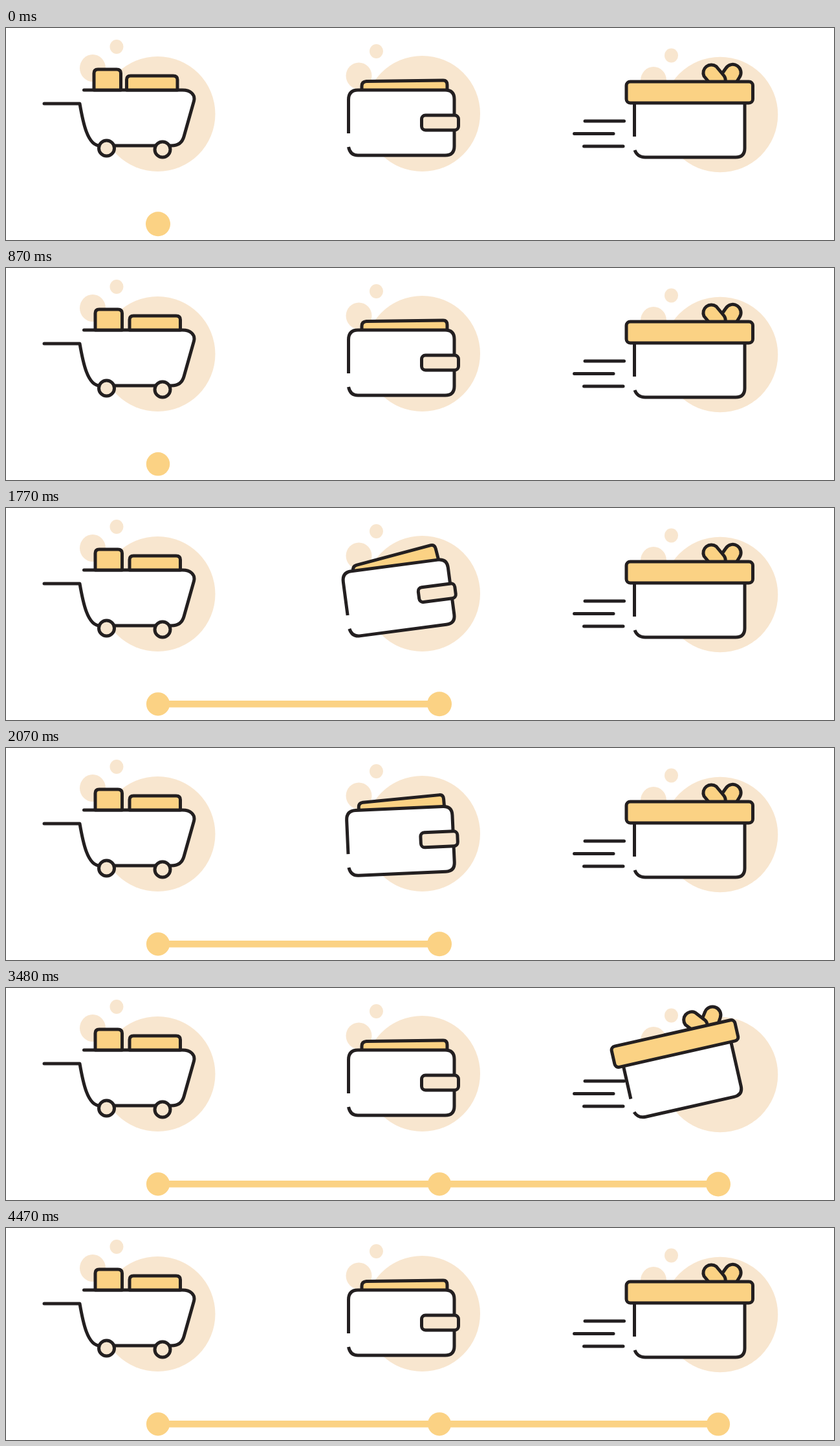
Animation of 1280 by 328 pixels, one loop 4.95 s. Source, as an HTML page:

```html
<!DOCTYPE html>
<html lang="en">
<head>
<meta charset="utf-8">
<title>Order steps</title>
<style>
  html, body { margin: 0; width: 100%; height: 100%; overflow: hidden; background: #fff; }
  svg { display: block; width: 100vw; height: 100vh; }
  .pale { fill: #f8e6cf; }
  .gold { fill: #fbd284; }
  .white { fill: #fff; }
  .ink { stroke: #231f20; stroke-width: 5; stroke-linejoin: round; }
  .round { stroke-linecap: round; }
</style>
</head>
<body>
<svg viewBox="0 0 1280 328">
  <g class="pale">
    <circle cx="234.5" cy="133" r="89"/>
    <ellipse cx="134" cy="62" rx="20" ry="21"/>
    <ellipse cx="171" cy="29" rx="10.5" ry="11"/>
    <circle cx="643.5" cy="132.5" r="89.5"/>
    <ellipse cx="545.5" cy="74" rx="20" ry="20.5"/>
    <ellipse cx="572.5" cy="36" rx="10.5" ry="11"/>
    <circle cx="1104" cy="134" r="89.3"/>
    <ellipse cx="1001" cy="81" rx="20" ry="21"/>
    <ellipse cx="1028.5" cy="42.5" rx="10.5" ry="11"/>
  </g>

  <g id="cart" class="ink round">
    <path class="white" d="M59 117H114C119 146 126 182 145 182H256Q271 182 275 168L290.500 113C293 103 285 96 273 96H120.500"/>
    <path id="tall" class="gold" d="M138 96V70Q138 64 144 64H173Q179.500 64 179.500 70V96Z"/>
    <path id="wide" class="gold" d="M191 96V80Q191 74 197 74H263Q269.500 74 269.500 80V96Z"/>
    <circle class="pale" cx="155.500" cy="186" r="12"/>
    <circle class="pale" cx="242" cy="188" r="12"/>
  </g>

  <g id="wallet" class="ink">
    <path id="card" class="gold" d="M550 108V90Q550 83 557 82.500L676 81Q682 81 682 88V108Z"/>
    <path class="white" d="M529.500 163V111Q529.500 96 544 96H679Q693 96 693 110V183Q693 197 679 197H544Q532 197 529.500 184"/>
    <rect class="pale" x="642.500" y="135" width="57" height="23" rx="6"/>
  </g>

  <path class="ink round" d="M895 144H955.500M878.500 163.500H939M893.500 183H954"/>
  <g id="gift" class="ink">
    <path class="white" d="M971.500 116V168L972 189Q976 200 988 200H1128Q1142 200 1142 186V116" stroke="none" style="stroke:none"/>
    <path fill="none" d="M971.500 116V168M972 189Q976 200 988 200H1128Q1142 200 1142 186V116"/>
    <path class="gold" d="M1106 72L1113 62A12.500 12.500 0 0 1 1134 76L1129 84H1106Z"/>
    <path class="gold" d="M1087 84L1079 74.500A12.500 12.500 0 0 1 1098 59.500L1110 74Q1113 78 1112 84Z"/>
    <rect class="gold" x="959" y="83" width="195.500" height="33" rx="6"/>
  </g>

  <g class="gold">
    <rect id="line0" x="235" y="298" height="10.500"/>
    <rect id="line1" x="670" y="298" height="10.500"/>
    <circle id="dot0" cx="235" cy="303.300"/>
    <circle id="dot1" cx="670" cy="303.300"/>
    <circle id="dot2" cx="1101" cy="303.500"/>
  </g>
</svg>
<script>
const LOOP = 4950, STEP = 1620, FIRST = 30;
const el = id => document.getElementById(id);
const set = (id, name, value) => el(id).setAttribute(name, value);
const part = (t, a, b) => Math.min(1, Math.max(0, (t - a) / (b - a)));
const smooth = x => x * x * (3 - 2 * x);
const cubic = x => x < .5 ? 4 * x ** 3 : 1 - 4 * (1 - x) ** 3;
const turn = (id, deg, x, y) => set(id, 'transform', `rotate(${-deg} ${x} ${y})`);

// quick lift, slower return; t counts from the start of a step
const swing = t => smooth(part(t, 0, 180)) - smooth(part(t, 180, 540));
const dotSize = t => 19 * smooth(part(t, -10, 90)) - .9 * smooth(part(t, 540, 930));

function draw(now) {
  const t = now % LOOP;
  const step = i => t - FIRST - i * STEP;

  turn('cart', 7 * swing(step(0)), 155.5, 187);
  const slide = 1 - smooth(part(step(0), 180, 600));
  set('tall', 'transform', `translate(${-2 * slide} 0)`);
  set('wide', 'transform', `translate(${-4.5 * slide} 0)`);

  const tilt = swing(step(1));
  turn('wallet', 10 * tilt, 552, 175);
  turn('card', 9 * tilt, 600, 118);

  turn('gift', 13 * swing(step(2)), 985, 195);

  [435, 431].forEach((length, i) =>
    set('line' + i, 'width', length * cubic(part(step(i), 1146, 1670))));
  for (let i = 0; i < 3; i++) {
    set('dot' + i, 'r', dotSize(i ? step(i) : Math.max(90, step(0))));
  }
}

const start = performance.now();
function tick() {
  draw(performance.now() - start);
  requestAnimationFrame(tick);
}
tick();
</script>
</body>
</html>
```
